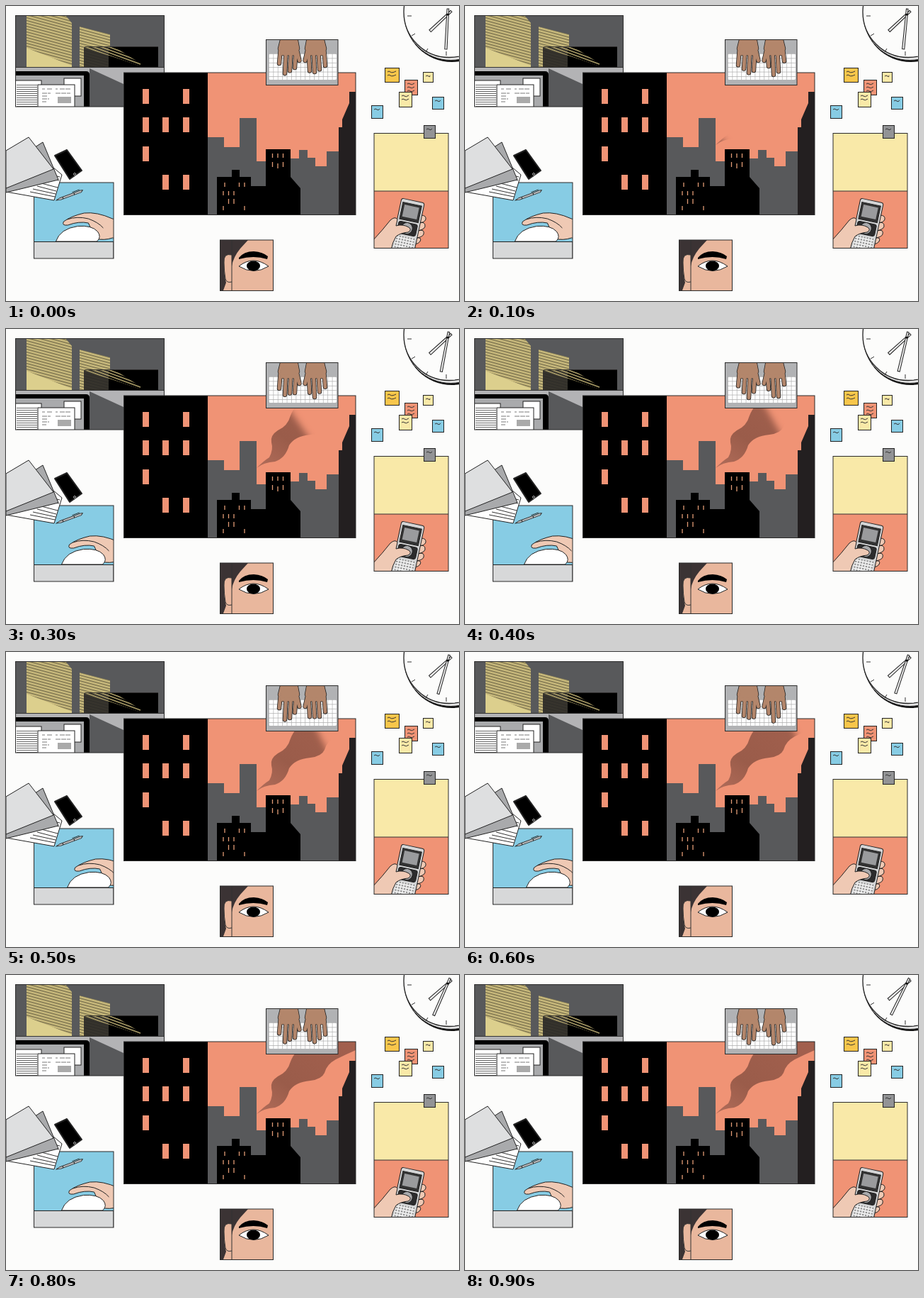
An HTML page that plays this animation: 640x416 px, repeating every 1 s.

```html
<!DOCTYPE html>
<html lang="en">
<head>
<meta charset="utf-8">
<title>Office collage</title>
<style>
html, body { margin: 0; width: 100%; height: 100%; overflow: hidden; background: #fcfcfb; }
svg { display: block; width: 100vw; height: 100vh; }
.ol { stroke: #222; stroke-width: 1; }
.frame { fill: none; stroke: #2a2a2a; stroke-width: 1; }
.ink { fill: none; stroke: #333; stroke-width: 1; }
</style>
</head>
<body>
<svg viewBox="0 0 640 416" preserveAspectRatio="none">
<defs>
  <pattern id="blind" width="10" height="4" patternUnits="userSpaceOnUse" patternTransform="skewY(15)">
    <rect width="10" height="4" fill="#cbbc7e"/><rect width="10" height="1.4" fill="#756c4a"/>
  </pattern>
  <pattern id="shade" width="10" height="4" patternUnits="userSpaceOnUse" patternTransform="skewY(20)">
    <rect width="10" height="1.6" fill="#b9ab70"/>
  </pattern>
  <pattern id="lines" width="40" height="3" patternUnits="userSpaceOnUse">
    <rect width="40" height="1" fill="#666"/>
  </pattern>
  <pattern id="keys" x="371" y="67" width="6.4" height="6.4" patternUnits="userSpaceOnUse">
    <path d="M0 0H6.4M0 0V6.4" stroke="#aaa" stroke-width="1.3"/>
  </pattern>
  <pattern id="pad" width="4" height="4" patternUnits="userSpaceOnUse">
    <rect width="4" height="4" fill="#eee"/><rect width="2.2" height="2" fill="#888"/>
  </pattern>
  <linearGradient id="haze" x1="0" y1="1" x2="1" y2="0">
    <stop stop-color="#b26d5a"/><stop offset=".35" stop-color="#9a5c4a"/><stop offset="1" stop-color="#a3604e"/>
  </linearGradient>
  <filter id="soft" x="-30%" y="-30%" width="160%" height="160%"><feGaussianBlur stdDeviation="5"/></filter>
  <mask id="grow" maskUnits="userSpaceOnUse" x="285" y="60" width="240" height="180">
    <path id="reveal" d="M345 203Q378 188 390 165Q395 140 425 125Q455 106 510 90" pathLength="100"
      fill="none" stroke="#fff" stroke-width="78" filter="url(#soft)"/>
  </mask>
  <clipPath id="cRoom"><rect x="13" y="13" width="211" height="129"/></clipPath>
  <clipPath id="cKeys"><rect x="367" y="47" width="102" height="64"/></clipPath>
  <clipPath id="cMouse"><rect x="39" y="249" width="113" height="107"/></clipPath>
  <clipPath id="cPhone"><rect x="520" y="261" width="105" height="81"/></clipPath>
  <clipPath id="cFace"><rect x="302" y="330" width="75" height="71"/></clipPath>
</defs>

<!-- room -->
<g clip-path="url(#cRoom)">
  <rect x="13" y="13" width="211" height="73" fill="#58595b"/>
  <path d="M29 13H84L93 24V86H29Z" fill="url(#blind)"/>
  <path d="M29 59L93 84V86H29Z" fill="#dccf8d"/>
  <path d="M104 29L147 40V86H104Z" fill="url(#blind)"/>
  <path d="M110 86V60Q110 57 113 57H215V86Z" fill="#272625" opacity=".9"/>
  <path d="M145 86V61Q145 58 148 58H215V86Z" fill="#000"/>
  <path d="M112 58H154L190 81V85Q165 76 146 70L112 60Z" fill="url(#shade)"/>
  <rect x="13" y="86" width="211" height="56" fill="#b3b3b5"/>
  <path d="M118 88L166 110V142H118Z" fill="#58595b"/>
  <path d="M13 86.5H224" class="ink"/>
  <path d="M13 92H113Q118 92 118 97V142H13Z"/>
  <rect x="13" y="98" width="97" height="44" fill="#a9aaac"/>
  <g fill="#fff" class="ol" stroke-width=".7">
    <rect x="82" y="102" width="24" height="25"/><rect x="10" y="105" width="40" height="40"/>
    <rect x="45" y="111" width="52" height="34"/>
  </g>
  <rect x="15" y="109" width="29" height="33" fill="url(#lines)"/>
  <path d="M51 117H55M58 117H66M51 123H63M51 127H59M51 131H61M51 135H57M70 117H73M76 117H91M70 123H91" class="ink" stroke-dasharray="7 1" opacity=".65"/>
  <rect x="73" y="128" width="19" height="9" fill="#aaa"/>
</g>
<rect x="13.5" y="13.5" width="210" height="128.5" class="frame"/>

<!-- city -->
<rect x="166" y="94" width="328" height="200" fill="#f09375"/>
<path d="M354 196Q364 186 372 181Q378 170 375 160Q373 150 384 143Q398 137 402 122Q405 114 412 106L430 94H494V106Q480 112 466 119Q453 126 450 138Q446 147 430 149Q408 151 400 164Q395 182 380 187Q364 188 354 196Z"
  fill="url(#haze)" mask="url(#grow)"/>
<path d="M285 185H308V199H330V158H354V219H402V215H414V203H426V214H437V226H453V205H470V294H285Z" fill="#58595b"/>
<path d="M298 294V241H319V231H330V241H346V254H367V202H402V241L416 257V294Z"/>
<path d="M470 294V171H475V160L485 137V121H494V294Z" fill="#231f20"/>
<rect x="166" y="94" width="119" height="200"/>
<g id="windows" fill="#f09375"></g>
<path d="M376.5 208v6M384 208v6M391.5 208v6M376.5 220v7M384 222v7M391.5 220v7M309 249v6M329.5 249v6M337 249v6M307 261v6M314.5 261v6M322 261v6M314.5 272v7M322 272v7M307 282v6M337 282v6" stroke="#e09a74" stroke-width="1.3"/>
<rect x="166.5" y="94" width="327.5" height="200.5" class="frame"/>

<!-- keyboard -->
<g clip-path="url(#cKeys)">
  <rect x="367" y="47" width="102" height="64" fill="#b1b2b4"/>
  <rect x="371" y="67" width="96" height="37" rx="2" fill="#fff"/>
  <rect x="371" y="67" width="96" height="37" fill="url(#keys)"/>
  <g id="hands" stroke-linecap="round" stroke-linejoin="round"></g>
</g>
<rect x="367.5" y="47.5" width="101.500" height="64" class="frame"/>

<!-- clock -->
<circle cx="630" cy="12" r="67" fill="#111"/>
<circle cx="628.5" cy="10.5" r="66" fill="#e4e4e4" class="ol"/>
<circle cx="626" cy="8.500" r="64" fill="#fcfcfb" stroke="#222" stroke-width="1.300"/>
<path d="M567 14h6M573 42l5-3M593 65l3-5M622 70v-6" class="ink"/>
<g fill="#eee" class="ol" stroke-width=".9">
  <path id="hour" d="M622.700 5h2.600l.5 41h-3.600Z"/>
  <path id="minute" d="M622.700 4h2.600l.3 57h-3.200Z"/>
</g>
<circle cx="624" cy="12" r="1.500"/>

<!-- notes -->
<g id="notes"></g>

<!-- mouse -->
<g clip-path="url(#cMouse)">
  <rect x="39" y="249" width="113" height="84" fill="#87cce4"/>
  <g id="mouse" class="ol">
    <path d="M180 306L150 300Q128 290 110 292Q92 296 81 304Q78 310 87 309Q103 303 116 306L126 328Q138 331 150 327L180 330Z" fill="#efc9b4"/>
    <path d="M86 301Q100 296 116 300Q130 305 137 313" fill="none"/>
    <path d="M70 332Q76 314 101 310.500Q121 309 129 318Q135 326 128 332Z" fill="#fff"/>
  </g>
  <rect x="39" y="332.500" width="113" height="25" fill="#d7d8d9" class="ol"/>
</g>
<rect x="39.500" y="249" width="112.500" height="107" class="frame"/>
<g transform="translate(71 274) rotate(-20) scale(1 .75)" class="ol">
  <path d="M0 0L6-2H37L40-1L37 2H6Z" fill="#b5b5b7"/><path d="M10-2V2M27-2V2M25-4H36" fill="none"/>
</g>

<!-- papers and phone -->
<g class="ol">
  <path d="M60 222L79 238L68 274L0 262V235Z" fill="#fff"/>
  <path d="M34 262L69 269M38 258L70 265M44 254L71 261M50 250L73 256M72 240L76 241M71 245L75 246" class="ink" stroke-width="1.500"/>
  <path d="M38 201L52 192L74 245L0 263V230Z" fill="#a9aaac"/>
  <path d="M0 204L32 185L67 230L0 257Z" fill="#dedfe0"/>
  <path d="M69 211L86 203L107 232L90 244Z" stroke-linejoin="round" stroke-width="2"/>
  <circle cx="97" cy="237" r="1.500" fill="none" stroke="#aaa"/>
</g>

<!-- handset -->
<rect x="520" y="179" width="105" height="82" fill="#f9e9a8"/>
<rect x="520" y="261" width="105" height="81" fill="#f09375"/>
<g clip-path="url(#cPhone)" class="ol">
  <path d="M574 300L586 295Q594 295 593 301Q591 306 582 306Q593 303 592 311Q591 315 582 317Q592 314 590 322Q588 326 580 327Q588 326 585 332Q580 338 570 335Z" fill="#efc9b4"/>
  <g transform="translate(559 271) rotate(12)">
    <rect width="33" height="84" rx="3" fill="#d4d5d6"/>
    <rect x="3" y="5" width="27" height="24" fill="#333"/>
    <rect x="6" y="8" width="21" height="17" fill="#9a9b9d" stroke="none"/>
    <rect x="3" y="52" width="27" height="32" fill="url(#pad)" stroke="none"/>
    <rect x="3" y="32" width="27" height="17" rx="3" fill="#2c2c2d"/>
    <circle cx="16" cy="40" r="8" fill="#a9aaac"/>
  </g>
  <path d="M518 344V331Q532 316 543 302Q550 296 553 301L551 310Q560 307 569 312Q574 316 568 319Q557 320 551 325Q546 333 544 344Z" fill="#efc9b4"/>
</g>
<path d="M520 261H625" class="ink"/>
<rect x="520" y="179.500" width="105" height="162" class="frame"/>
<g id="pin"></g>

<!-- face -->
<g clip-path="url(#cFace)">
  <rect x="302" y="330" width="75" height="71" fill="#e9b79d"/>
  <path d="M302 330H342L331 342Q321 354 319 367V401H302Z" fill="#3b3334"/>
  <path d="M319 351Q307 348 308 362Q308 380 311 390L307 401H319Z" fill="#e9b79d"/>
  <path d="M319 351Q307 348 308 362Q308 373 310 385Q312 391 319 389M319 330V401" class="ink"/>
  <path d="M329 355Q336 346 350 346Q363 347 370 353L369 357Q350 351 329 357Z"/>
  <path d="M329 367Q349 351 371 367Q350 380 329 367Z" fill="#fff" class="ol"/>
  <ellipse cx="349.500" cy="366.500" rx="9.500" ry="7"/>
</g>
<rect x="302.500" y="330" width="75" height="71.500" class="frame"/>
</svg>

<script>
const $ = id => document.getElementById(id);

$('windows').innerHTML = [[193, 117], [250, 117], [193, 157], [221, 157], [250, 157], [193, 198], [221, 238], [250, 238]]
  .map(([x, y]) => `<rect x="${x}" y="${y}" width="9" height="21"/>`).join('');

const note = (x, y, w, h, fill, rows) => {
  let s = `<rect x="${x}.5" y="${y}.5" width="${w}" height="${h}" fill="${fill}" class="ol"/>`;
  for (let i = 0; i < rows; i++)
    s += `<path d="M${x + 4} ${y + 6 + i * 5}q2-2 4 0t${w - 12} -1" class="ink"/>`;
  return s;
};
$('notes').innerHTML = [
  [535, 87, 20, 20, '#f8c64b', 2], [563, 104, 18, 21, '#f09375', 3], [589, 93, 14, 14, '#f9e9a8', 1],
  [555, 121, 18, 21, '#f9e9a8', 2], [602, 128, 16, 17, '#87cce4', 1], [516, 140, 16, 18, '#87cce4', 1]
].map(a => note(...a)).join('');
$('pin').innerHTML = note(590, 168, 16, 18, '#929395', 1);

// One hand as a palm plus finger strokes; side 1 mirrors it.
function hand(n, side) {
  const X = x => side ? 837 - x : x;
  let d = `M${X(391)} 44L${X(409)} 44L${X(412)} 60L${X(408)} 67L${X(389)} 67L${X(387)} 60Z`;
  [[386, 81], [394, 92], [401, 94], [408, 88]].forEach(([x, y], k) => {
    const tip = y + 3.5 * Math.sin(n * 2.4 + k * 2 + side * 2);
    d += `M${X(x + 1.5)} 64L${X(x)} ${tip}`;
  });
  d += `M${X(411)} 62L${X(414.5)} 77`;
  return `<path d="${d}" fill="#b3866b" stroke="#222" stroke-width="6.4"/>` +
    `<path d="${d}" fill="#b3866b" stroke="#b3866b" stroke-width="4.8"/>`;
}

const smoke = [0, 12, 40, 49, 59, 65, 76, 88, 95, 101];

function draw(now) {
  const n = Math.floor(now % 1000 / 100);
  $('reveal').setAttribute('stroke-dasharray', `${smoke[n]} 200`);
  $('reveal').setAttribute('visibility', n ? 'visible' : 'hidden');
  $('mouse').setAttribute('transform', `translate(${8.5 - 8.5 * Math.cos((n - .5) * Math.PI / 5)} 0)`);
  $('minute').setAttribute('transform', `rotate(${3 + 2.6 * n} 624 12)`);
  $('hour').setAttribute('transform', `rotate(${47 + .2 * n} 624 12)`);
  $('hands').innerHTML = hand(n, 0) + hand(n, 1);
  requestAnimationFrame(() => draw(performance.now()));
}
draw(0);
</script>
</body>
</html>
```
